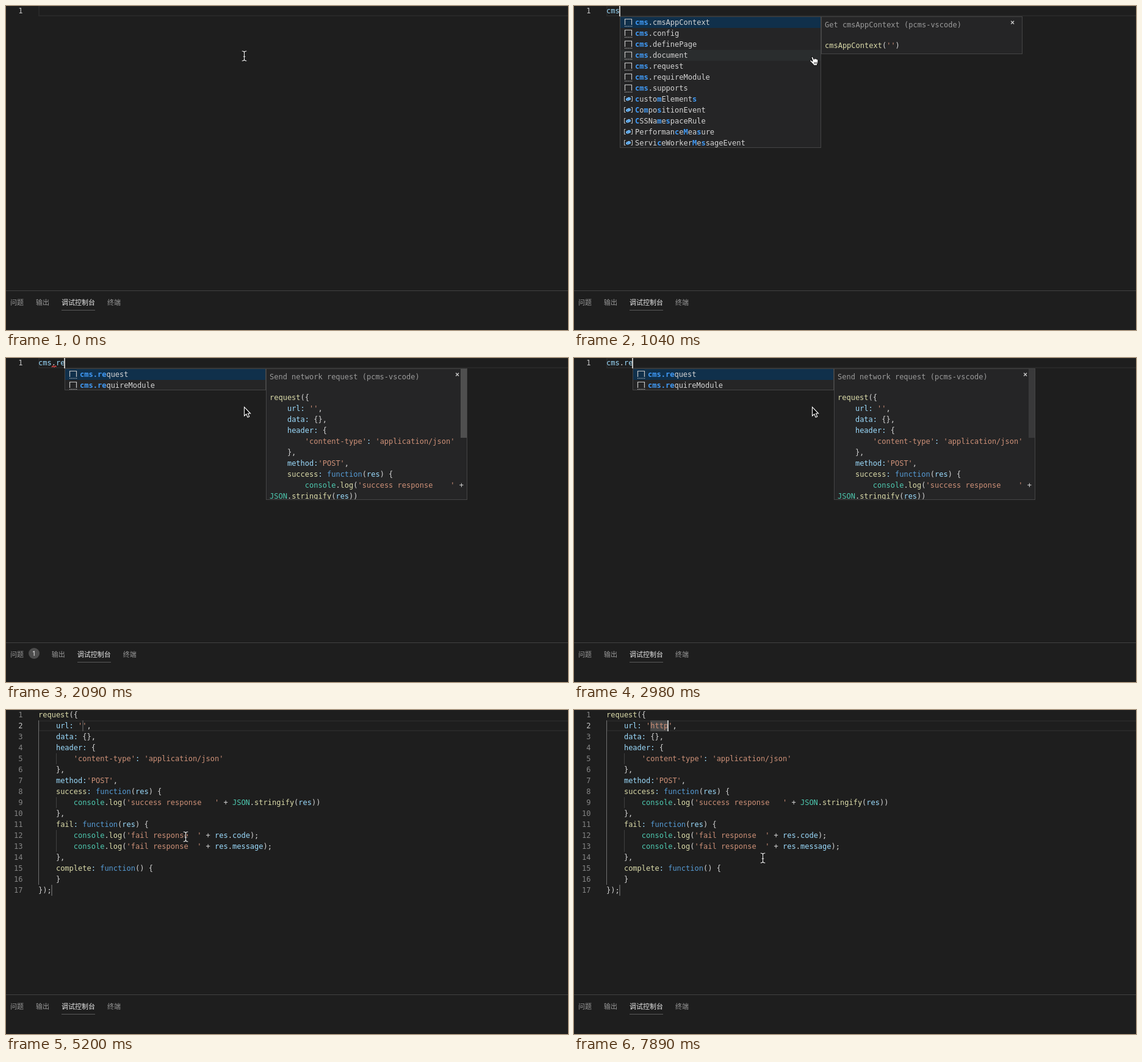
Recreate the animation shown at these times as an HTML page. Size 921 px wide and 532 px high, loop 8000 ms.

```html
<!DOCTYPE html>
<html lang="zh">
<head>
<meta charset="utf-8">
<title>Snippet completion</title>
<style>
html, body { margin: 0; width: 100%; height: 100%; overflow: hidden; background: #1e1e1e; }
#stage { position: relative; width: 921px; height: 532px; overflow: hidden; color: #d4d4d4;
  font: 12px/18px "DejaVu Sans Mono", monospace; }
#stage div { position: absolute; white-space: pre; box-sizing: border-box; }
#stage svg { position: absolute; overflow: visible; }
.current { left: 53px; width: 870px; height: 18px; border: 2px solid #282828; }
.number { left: 0; width: 27.5px; text-align: right; color: #858585; }
.number.on { color: #c6c6c6; }
.guide { width: 1px; background: #404040; }
.guide.on { background: #707070; }
.stop { height: 18px; background: #474747; }
.caret { width: 2px; height: 18px; background: #c4c4c2; }
.str { color: #ce9178; } .key { color: #569cd6; } .obj { color: #4ec9b0; }
.fn { color: #dcdcaa; } .prop { color: #9cdcfe; }
.box { top: 17px; width: 330px; overflow: hidden; background: #252526; border: 1px solid #454545; }
.row { left: 0; width: 328px; height: 18px; padding-left: 24px; }
.row.hover { background: #2a2d2e; }
.row.focus { background: #10304b; }
.row b { color: #409bf8; }
.row svg { left: 5px; top: 1px; }
.note { left: 5px; top: 4px; color: #9b9b9b; }
.close { left: 309px; top: 0; font-weight: bold; color: #c5c5c5; }
.bar { right: 0; top: 0; width: 10px; height: 113px; background: #4f4f4f; }
.panel { left: 0; top: 467px; width: 921px; height: 65px; border-top: 1px solid #424242;
  font: 11px/18px "Noto Sans CJK SC", "Noto Sans CJK", sans-serif; color: #979797; }
.panel div { top: 9px; }
.panel .on { color: #e7e7e7; height: 23px; border-bottom: 1px solid #5a5a5a; }
.panel .badge { left: 37px; top: 8px; width: 18px; height: 18px; border-radius: 9px; background: #4d4d4d;
  color: #fff; text-align: center; font-family: "Open Sans", sans-serif; }
</style>
</head>
<body>
<div id="stage"></div>
<script>
const stage = document.getElementById('stage');
const LOOP = 8000, LEFT = 53, CHAR = 7.224, LINE = 18;

const requestBody = [
  'request({',
  "    url: '',",
  '    data: {},',
  '    header: {',
  "        'content-type': 'application/json'",
  '    },',
  "    method:'POST',",
  '    success: function(res) {',
];
const snippet = [
  ...requestBody,
  "        console.log('success response   ' + JSON.stringify(res))",
  '    },',
  '    fail: function(res) {',
  "        console.log('fail response  ' + res.code);",
  "        console.log('fail response  ' + res.message);",
  '    },',
  '    complete: function() {',
  '    }',
  '});',
];

const icons = {
  cube: `<path d="M8 1.5 14 4.7V11L8 14.5 2 11V4.7ZM2 4.7 8 8l6-3.3M8 8v6.5" stroke="#b180d7" stroke-width="1.1"/>`,
  prop: `<path d="M3.5 3.5h-2v8h2M12.5 3.5h2v8h-2" stroke="#c5c5c5"/>
    <path d="M4 7 9 4.5 12 6v2.5L7 11 4 9.5Z" fill="#75beff"/><path d="M4 7l3 1.3L12 6M7 8.3V11" stroke="#2c6da8" stroke-width=".7"/>`,
  word: `<path d="M2.5 2.5h5v3h-5ZM10 3.5h5M1 7.5h7M10 7.5h2M13 7.5h2M1 10.5h4M6 10.5h5M12 10.5h3M1 13.5h8M11 13.5h4" stroke="#c5c5c5"/>`,
  snip: `<path d="M2.5 12V2.5h11V12" stroke="#c5c5c5" stroke-width="1.2"/><path d="M2 14.3h12.5" stroke="#c5c5c5" stroke-dasharray="1.5 1.2"/>`,
  abc: `<path d="M1.5 3.5h13v10h-13Z" stroke="#c5c5c5"/><text x="8" y="10.5" font-size="6" text-anchor="middle" fill="#d4d4d4">abc</text>`,
};

// Each entry: icon name, then the labels that use it.
const entry = (icon, labels) => labels.split(' ').map(label => ({ icon, label }));
const globals = [
  ...entry('prop', 'caches'),
  ...entry('cube', 'cancelAnimationFrame captureEvents'),
  ...entry('word', 'case catch class'),
  ...entry('cube', 'clearInterval clearTimeout'),
  ...entry('prop', 'clientInformation'),
  ...entry('cube', 'close'),
  ...entry('prop', 'closed'),
  ...entry('cube', 'confirm'),
];
const members = entry('snip',
  'cms.cmsAppContext cms.config cms.definePage cms.document cms.request cms.requireModule cms.supports');
const mixed = [...members, ...entry('prop',
  'customElements CompositionEvent CSSNamespaceRule PerformanceMeasure ServiceWorkerMessageEvent')];
const requests = members.filter(item => item.label.startsWith('cms.re'));

const contextHelp = { note: 'Get cmsAppContext (pcms-vscode)', code: ["cmsAppContext('')"], height: 62 };
const requestHelp = {
  note: 'Send network request (pcms-vscode)',
  code: [...requestBody, "        console.log('success response    ' +", 'JSON.stringify(res))'],
  height: 216,
};

const pointers = {
  beam: `<g fill="none" stroke-linecap="round"><path id="b" d="M-3-8Q0-8 .5-6Q1-8 4-8M.5-6V6M-3 8Q0 8 .5 6Q1 8 4 8M-1 1h3" stroke="#111" stroke-width="2.6"/>
    <path d="M-3-8Q0-8 .5-6Q1-8 4-8M.5-6V6M-3 8Q0 8 .5 6Q1 8 4 8M-1 1h3" stroke="#eee" stroke-width="1.1"/></g>`,
  arrow: `<path d="M.5-1.5V13l3.3-3 2.3 5.3 2.6-1.1L6.4 9H10.5Z" fill="#000" stroke="#fff" stroke-width="1.1"/>`,
  hand: `<path d="M-1 2.2Q-.5 0 1.3 1.6L3.5 6V4.6q1.3-1.2 2.3.3 1.4-.8 2.2.6 1.7-.3 1.9 1.2v4q-.3 2-1.4 3v2H2.5v-1.4L-1.6 10q-2.4-2.1-2-2.9 1.3-1 3.3.9L1.2 8.8Z"
    fill="#fff" stroke="#000"/><path d="M4 10v3.5M6 10v3.5M8 10v3.5" stroke="#000" stroke-width=".8"/>`,
};

const start = { text: '', caret: false, list: null, help: null, bar: 1, error: false, snippet: false, pointer: 'beam', at: [390, 82] };
const steps = [
  [0, {}],
  [150, { caret: true }],
  [750, { text: 'c', list: globals, pointer: 'arrow' }],
  [890, { text: 'cm', list: mixed, pointer: 'hand' }],
  [1040, { text: 'cms', help: contextHelp }],
  [1490, { text: 'cms.', list: [...members, ...entry('abc', 'cms')] }],
  [1790, { text: 'cms.r', list: requests, help: requestHelp, pointer: 'arrow' }],
  [1940, { text: 'cms.re' }],
  [2090, { error: true }],
  [2380, { error: false }],
  [2530, { caret: false }],
  [2980, { caret: true, bar: 0.5 }],
  [3130, { bar: 0 }],
  [3430, { snippet: true, text: '', list: null, help: null, pointer: 'beam' }],
  [3880, { caret: false }],
  [4330, { caret: true, at: [389, 83] }],
  [4475, { at: [378, 98] }],
  [4620, { at: [356, 128] }],
  [4765, { at: [330, 162], caret: false }],
  [4910, { at: [310, 186] }],
  [5055, { at: [298, 202] }],
  [5200, { at: [294, 208] }],
  [5350, { at: [300, 225], caret: true }],
  [5500, { at: [312, 252] }],
  [5645, { at: [311, 248] }],
  [5790, { at: [309, 243], caret: false }],
  [6390, { caret: true }],
  [6840, { caret: false }],
  [7140, { text: 'h', caret: true }],
  [7590, { text: 'ht' }],
  [7740, { text: 'htt' }],
  [7890, { text: 'http' }],
];
let last = start;
const states = steps.map(([time, change]) => (last = { ...last, ...change, time }));

const columnX = column => LEFT + column * CHAR;
const lineY = index => index * LINE - 1;
const div = (cls, style, content = '') => `<div class="${cls}" style="${style}">${content}</div>`;
const svg = (x, y, content) => `<svg width="16" height="16" fill="none" style="left:${x}px;top:${y}px">${content}</svg>`;

function colour(code) {
  return code.replace(/'[^']*'|\w+|:/g, (token, index) => {
    const called = code[index + token.length] === '(';
    const cls = token[0] === "'" ? 'str'
      : token === 'function' ? 'key'
      : /^(console|JSON)$/.test(token) ? 'obj'
      : called || /^(success|fail|complete)$/.test(token) ? 'fn' : 'prop';
    return `<span class="${cls}">${token}</span>`;
  });
}

function emphasise(label, typed) {
  let found = 0;
  const html = [...label].map(char =>
    char.toLowerCase() === typed[found] ? (found++, `<b>${char}</b>`) : char).join('');
  return found === typed.length ? html : label;
}

function drawEditor(state) {
  const lines = state.snippet
    ? snippet.map((line, i) => i === 1 ? line.replace("''", `'${state.text}'`) : line)
    : [state.text];
  const active = state.snippet ? 1 : 0;
  const column = state.text.length + (state.snippet ? 10 : 0);
  let html = div('current', `top:${lineY(active)}px`);
  if (state.snippet) {
    html += div('guide on', `left:53px;top:17px;height:270px`);
    for (const [index, count] of [[4, 1], [8, 1], [11, 2]])
      html += div('guide', `left:82px;top:${lineY(index)}px;height:${count * LINE}px`);
    html += div('stop', `left:125px;top:17px;width:${Math.max(2, state.text.length * CHAR)}px`);
    html += div('stop', `left:74px;top:${lineY(16)}px;width:2px;background:#525252`);
  }
  lines.forEach((line, i) => {
    html += div(i === active ? 'number on' : 'number', `top:${lineY(i)}px`, i + 1);
    html += div('', `left:${LEFT}px;top:${lineY(i)}px`, colour(line));
  });
  if (state.error)
    html += svg(75, 12, '<path d="M0 3 2 1 4 3 6 1 7.5 2.5" stroke="#f14c4c" stroke-width="1.2"/>');
  if (state.caret)
    html += div('caret', `left:${Math.max(LEFT, Math.round(columnX(column)) - 1)}px;top:${lineY(active)}px`);
  return html;
}

function drawPopup({ text, list, help, bar, pointer }) {
  if (!list) return '';
  const left = Math.round(columnX(text.length));
  const rows = list.map(({ icon, label }, i) => {
    const mark = i === 0 ? ' focus' : i === 3 && pointer === 'hand' ? ' hover' : '';
    return div('row' + mark, `top:${i * LINE}px`, svg(5, 1, icons[icon]) + emphasise(label, text));
  }).join('');
  let html = div('box', `left:${left}px;height:${list.length * LINE}px`, rows);
  if (help) {
    const code = help.code.map((line, i) => div('', `left:5px;top:${38 + i * LINE}px`, colour(line))).join('');
    const scroll = help === requestHelp ? div('bar', `opacity:${bar}`) : '';
    html += div('box', `left:${left + 330}px;height:${help.height}px`,
      scroll + div('note', '', help.note) + code + div('close', '', '×'));
  }
  return html;
}

function drawPanel({ error }) {
  const shift = error ? 25.7 : 0;
  const tab = (x, label, cls = '') => div(cls, `left:${x}px`, label);
  return div('panel', '', tab(7, '问题') + (error ? div('badge', '', '1') : '')
    + tab(49 + shift, '输出') + tab(91 + shift, '调试控制台', 'on') + tab(166 + shift, '终端'));
}

function draw(state) {
  stage.innerHTML = drawEditor(state) + drawPopup(state) + drawPanel(state)
    + svg(state.at[0], state.at[1], pointers[state.pointer]);
}

let shown;
const begin = performance.now();
function tick() {
  const time = (performance.now() - begin) % LOOP;
  const state = states.findLast(item => item.time <= time);
  if (state !== shown) draw(shown = state);
  requestAnimationFrame(tick);
}
tick();
</script>
</body>
</html>
```
